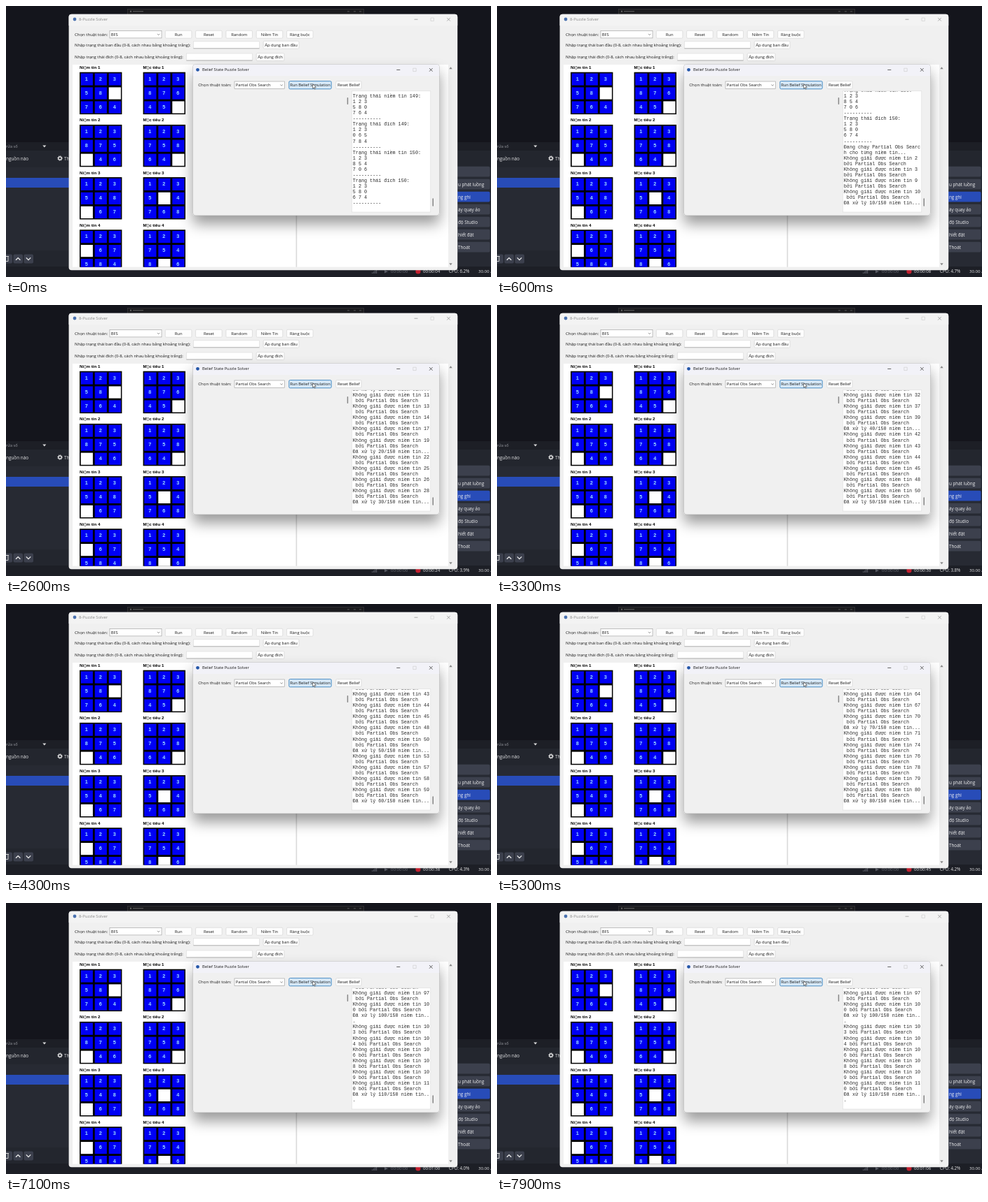
Animation, 692 px wide and 388 px high, one loop 8000 ms. Source, as an HTML page:

```html
<!DOCTYPE html>
<html lang="vi">
<head>
<meta charset="utf-8">
<title>Belief State Puzzle Solver</title>
<style>
  html, body { margin: 0; width: 100%; height: 100%; overflow: hidden; background: #14151c; }
  svg { display: block; width: 100vw; height: 100vh; }
  text { font-family: "Open Sans", "Noto Sans", sans-serif; white-space: pre; }
  .bold { font-family: "Liberation Sans", Arial, "DejaVu Sans", sans-serif; font-weight: bold; }
  .mono { font-family: "Liberation Mono", "Courier New", monospace; }
</style>
</head>
<body>
<svg id="stage" viewBox="0 0 692 388" xmlns="http://www.w3.org/2000/svg"></svg>
<script>
const LOOP = 8000;
const stage = document.getElementById("stage");

// Drawing helpers; all return markup
const rect = (x, y, w, h, fill, more = "") =>
  `<rect x="${x}" y="${y}" width="${w}" height="${h}" fill="${fill}" ${more}/>`;
const text = (x, y, s, size = 6, fill = "#1a1a1a", more = "") =>
  `<text x="${x}" y="${y}" font-size="${size}" fill="${fill}" ${more}>${s}</text>`;
const path = (d, stroke, width = 0.8, fill = "none") =>
  `<path d="${d}" stroke="${stroke}" stroke-width="${width}" fill="${fill}"/>`;
const button = (x, y, w, label) =>
  rect(x, y, w, 11, "#fdfdfd", 'stroke="#d0d0d0" stroke-width=".6" rx="1.5"') +
  text(x + w / 2, y + 7.6, label, 5.85, "#1a1a1a", 'text-anchor="middle"');
const entry = (x, y, w) =>
  rect(x, y, w, 10, "#fff", 'stroke="#d4d4d4" stroke-width=".5"') +
  path(`M${x} ${y + 10}h${w}`, "#8a8a8a", 0.6);
const combo = (x, y, w, label) =>
  rect(x, y, w, 10.5, "#fff", 'stroke="#9a9a9a" stroke-width=".6"') +
  text(x + 1.8, y + 7.3, label, 5.85) +
  path(`M${x + w - 6} ${y + 4.5}l1.7 1.7l1.7 -1.7`, "#444", 0.6);
const caption = (x, y, color) =>
  path(`M${x - 49} ${y}h5`, color, 0.7) +
  path(`M${x - 25.5} ${y - 2.2}h4.4v4.4h-4.4z`, "#cacaca", 0.6) +
  path(`M${x - 2.3} ${y - 2.3}l4.6 4.6m0 -4.6l-4.6 4.6`, color, 0.7);

function recorder() {
  const labels = ["", "u phát luồng", "ng ghi", "áy quay ảo", "độ Studio", "hiết đặt", "Thoát"];
  let s = rect(0, 0, 692, 388, "#14151c") +
    rect(173.5, 4.5, 337, 8, "#1c1c1f", 'stroke="#3a3a3c" stroke-width=".7"') +
    rect(177, 6.7, 2, 2, "#666") + rect(181, 7, 15, 1.2, "#555") +
    path("M487 7.8h3m6 0h3m5 0h3", "#777", 0.6) +
    rect(0, 195, 692, 193, "#1d1f26") +
    rect(0, 207, 692, 24, "#23262e") +
    rect(0, 231, 692, 142, "#272a33") +
    rect(0, 246, 92, 14, "#284cb8") +
    rect(0, 350, 92, 23, "#23262e") +
    text(0, 203, "rửa sổ", 5.6, "#9a9ca2") +
    path("M52.3 199.6h5l-2.5 3z", "none", 0, "#ddd") +
    text(0, 220.6, "nguồn nào", 6.4, "#e4e4e6") +
    '<circle cx="77" cy="218" r="2.2" fill="none" stroke="#eee" stroke-width="1.3"/>' +
    '<circle cx="77" cy="218" r="3.2" fill="none" stroke="#eee" stroke-width="1" stroke-dasharray="1.25 1.25"/>' +
    text(83, 220.6, "Thuộc", 6.4, "#e4e4e6") +
    [-4.5, 10.5, 25.5].map(x => rect(x, 355.5, 13.5, 13, "#3c404d", 'rx="2"')).join("") +
    path("M-1 358.5h4v7h-4m-1 -7h6", "#ddd", 0.9) +
    path("M14 363.8l3.2 -3.2l3.2 3.2M28.8 360.4l3.2 3.2l3.2 -3.2", "#eee", 1.3);
  labels.forEach((label, i) => {
    const y = 229.7 + 18 * i;
    s += rect(600, y, 90.5, 14.8, label === "ng ghi" ? "#284cb8" : "#3c404d", 'rx="2"') +
      text(645, y + 9.8, label, 6.3, "#f0f0f2");
  });
  // Status bar
  s += rect(0, 374, 692, 14, "#1d1f26") +
    [0, 1, 2, 3].map(i => rect(522 + 2 * i, 381.5 - 1.4 * i, 1.2, 1.5 + 1.4 * i, "#555861")).join("") +
    path("M540 378l5 2.3l-5 2.3z", "none", 0, "#555861") +
    text(549, 381.9, "00:00:00", 6.1, "#6b6e77") +
    '<circle cx="588" cy="380" r="3.6" fill="#c3202f"/>' +
    text(595, 381.9, "", 6.1, "#e4e4e6", 'id="clock"') +
    text(632, 381.9, "", 6.2, "#e4e4e6", 'id="cpu"') +
    text(674, 381.9, "30.00 / 30.00 FPS", 6.1, "#e4e4e6");
  return s;
}

function puzzle(x, y, title, cells) {
  let s = text(x, y - 4.6, title, 6.2, "#000", 'class="bold"') + rect(x, y, 60.4, 60.4, "#000");
  [...cells].forEach((c, i) => {
    const cx = x + 1.7 + (i % 3) * 20, cy = y + 1.7 + Math.floor(i / 3) * 20;
    s += rect(cx, cy, 17.2, 17.2, c === "0" ? "#fff" : "#0000f5");
    if (c !== "0") s += text(cx + 8, cy + 10.2, c, 7.3, "#9cdcff", 'class="bold" text-anchor="middle"');
  });
  return s;
}

function mainWindow() {
  const starts = ["123580764", "123875046", "123548067", "123067584"];
  const goals = ["123876450", "123758640", "123504768", "123754806"];
  const hint = "(0-8, cách nhau bằng khoảng trắng):";
  let s = rect(89.6, 11.7, 554.6, 366.6, "#f0f0f0", 'rx="4"') +
    path("M89.6 28V15.7q0 -4 4 -4H640.2q4 0 4 4V28z", "none", 0, "#f3f3f3") +
    '<circle cx="98" cy="19" r="2.4" fill="#4a72b0"/>' +
    text(104, 21.1, "8-Puzzle Solver", 5.9, "#8a8a8a") +
    caption(631.5, 19.2, "#8a8a8a") +
    text(98, 42.8, "Chọn thuật toán:") + combo(148, 35.4, 74, "BFS");
  ["Run", "Reset", "Random", "Niềm Tin", "Ràng buộc"].forEach((label, i) => {
    s += button(227.3 + 43.3 * i, 35.2, 37.6, label);
  });
  s += text(98, 57.9, "Nhập trạng thái ban đầu " + hint, 5.85) + entry(267.5, 50.8, 94) +
    button(367.2, 50.2, 50.8, "Áp dụng ban đầu") +
    text(98, 75.3, "Nhập trạng thái đích " + hint, 5.87) + entry(257.5, 68, 94) +
    button(357.2, 67.6, 39.8, "Áp dụng đích") +
    rect(95, 84, 536, 289.7, "#fff") +
    rect(413.6, 84, 1.6, 289.7, "#d9d9d9") +
    path("M632.3 90.3l2.2 -3l2.2 3zM632.3 368.3l2.2 3l2.2 -3z", "none", 0, "#888");
  s += '<g clip-path="url(#board)">';
  starts.forEach((cells, i) => {
    const y = 94.7 + 75.2 * i;
    s += puzzle(105, y, `Ni▯m tin ${i + 1}`, cells) + puzzle(195.6, y, `M▯c tiêu ${i + 1}`, goals[i]);
  });
  return s + "</g>";
}

function popup() {
  return '<g clip-path="url(#window)">' +
    rect(266.5, 83.5, 352, 216.5, "#f0f0f0", 'rx="4" filter="url(#shadow)"') + "</g>" +
    rect(266.5, 83.5, 352, 216.5, "#f0f0f0", 'rx="4" stroke="#b0b0b0" stroke-width=".6"') +
    path("M266.8 100V87.5q0 -3.7 4 -3.7H614.2q4 0 4 3.7V100z", "none", 0, "#f2f2f8") +
    '<circle cx="273.5" cy="91.3" r="2.4" fill="#2456a8"/>' +
    text(280, 93.4, "Belief State Puzzle Solver", 5.75) +
    caption(606.3, 91.4, "#222") +
    text(274.3, 115.2, "Chọn thuật toán:") + combo(326, 108, 71.5, "Partial Obs Search") +
    rect(403.8, 107.6, 60.4, 11.2, "#d6e8f7", 'stroke="#3a84c0" stroke-width=".9" rx="1.5"') +
    text(434, 115.3, "Run Belief Simulation", 5.8, "#1a1a1a", 'text-anchor="middle"') +
    button(470.8, 107.6, 36.2, "Reset Belief") +
    rect(486.7, 131, 1.5, 10, "#858585", 'rx=".7"') +
    rect(493.5, 121.8, 112.3, 173.2, "#fff", 'stroke="#d8d8d8" stroke-width=".5"') +
    rect(608.5, 275.2, 1.5, 11.5, "#858585", 'rx=".7"') +
    '<g id="log" clip-path="url(#logbox)"></g>' +
    path("M437.6 111.6v6.6l1.6 -1.4l1.1 2.4l1 -.5l-1.1 -2.3h2.1z", "#111", 0.5, "#fff");
}

stage.innerHTML = `<defs>
  <filter id="shadow" x="-20%" y="-20%" width="140%" height="150%">
    <feDropShadow dx="0" dy="12" stdDeviation="10" flood-opacity=".4"/></filter>
  <clipPath id="window"><rect x="89.6" y="11.7" width="554.6" height="366.6" rx="4"/></clipPath>
  <clipPath id="board"><rect x="95" y="84" width="319" height="289.7"/></clipPath>
  <clipPath id="logbox"><rect x="493.8" y="122.2" width="111.8" height="172.5"/></clipPath>
</defs>` + recorder() + mainWindow() + popup();

// Log: a batch of failures is added for every ten beliefs handled
const COLS = 27, ROWS = 21, LINE = 8.06;
const wrap = s => s.match(new RegExp(`.{1,${COLS}}`, "g"));
const state = (kind, n, rows) => [`Trạng thái ${kind} ${n}:`, ...rows.split("/"), "-".repeat(10)];
const batches = [
  "2 3 9 10", "11 13 14 17 19", "22 25 26 28", "31 32 37 39", "42 43 44 45 48 50", "53 57 58 59",
  "62 64 67 70", "71 74 76 78 79 80", "81 83 84 85 87 89", "92 95 97 100", "103 104 106 108 109 110"
];
const batchTimes = [300, 1400, 2200, 2700, 3200, 4100, 4600, 5100, 6100, 6600, 7100];

const views = [[
  ...state("niềm tin", 149, "1 2 3/5 8 0/7 6 4"), ...state("đích", 149, "1 2 3/0 6 5/7 8 4"),
  ...state("niềm tin", 150, "1 2 3/8 5 4/7 0 6"), ...state("đích", 150, "1 2 3/5 8 0/6 7 4")
]];
batches.forEach((batch, i) => {
  const added = i ? [] : ["Đang chạy Partial Obs Search cho từng niềm tin..."];
  for (const n of batch.split(" ")) added.push(`Không giải được niềm tin ${n} bởi Partial Obs Search`);
  added.push(`Đã xử lý ${10 * (i + 1)}/150 niềm tin...`);
  views.push([...views[i], ...added.flatMap(wrap)]);
});

const cpuLoad = [6.2, 5.3, 4.7, 4.4, 4.6, 4.2, 4.1, 4.3, 3.9, 4.4, 4.0, 3.8, 4.1, 4.5,
  4.3, 4.0, 4.6, 4.2, 3.9, 4.4, 4.1, 4.3, 4.5, 4.0, 4.4, 3.9, 4.2];

const log = document.getElementById("log");
const clock = document.getElementById("clock");
const cpu = document.getElementById("cpu");
const pad = n => String(n).padStart(2, "0");
let shown = -1;

function draw(ms) {
  const t = Math.floor(ms / 100) * 100;
  const done = batchTimes.filter(b => b <= t).length;
  if (done !== shown) {
    shown = done;
    const rows = views[done].slice(-ROWS);
    log.innerHTML = rows.map((row, i) =>
      text(494.8, 284.2 - LINE * (rows.length - 1 - i), row, 6.75, "#2a2a2a", 'class="mono"')).join("");
  }
  const secs = Math.floor(4.1 + 0.0079 * t);
  clock.textContent = `00:${pad(Math.floor(secs / 60))}:${pad(secs % 60)}`;
  cpu.textContent = `CPU: ${cpuLoad[Math.floor(t / 300)].toFixed(1)}%`;
}

function tick() {
  draw(performance.now() % LOOP);
  requestAnimationFrame(tick);
}
tick();
</script>
</body>
</html>
```
